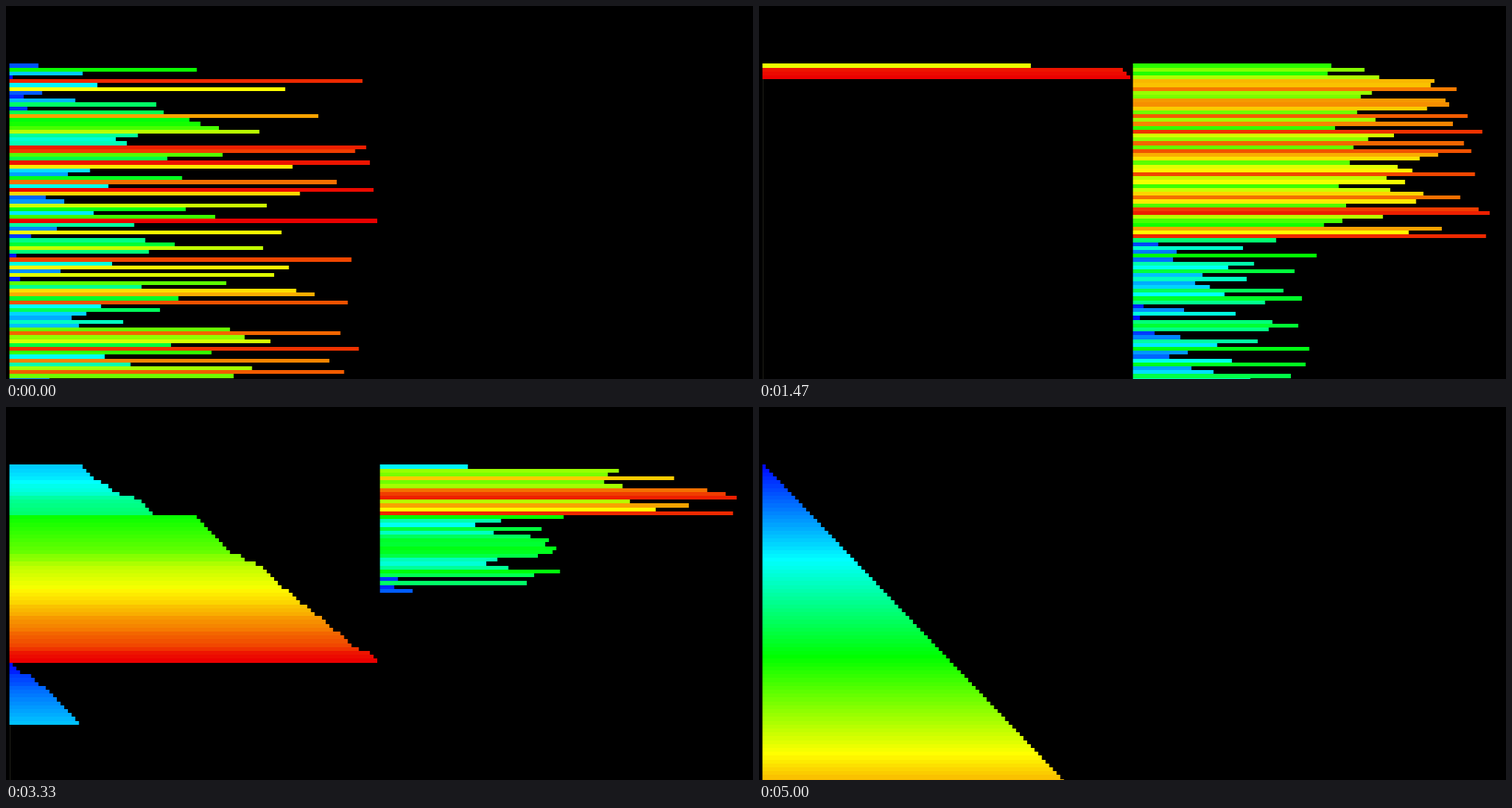
An HTML page with a canvas that plays this animation: 1000 px wide and 500 px high, repeating every 5070 ms.

```html
<!DOCTYPE html>
<html lang="en">
<head>
<meta charset="utf-8">
<title>Two-stack sort</title>
<style>
  html, body { margin: 0; width: 100%; height: 100%; overflow: hidden; background: #000; }
  canvas { display: block; width: 100%; height: 100%; }
</style>
</head>
<body>
<canvas id="stage" width="1000" height="500"></canvas>
<script>
const ctx = document.getElementById('stage').getContext('2d');

const LOOP = 5070, STEP = 200 / 3;
const TOP = 77.3, ROW = 5.2, UNIT = 4.93;
const LEFT_X = 4, RIGHT_X = 500;

const shuffled = [
  8, 51, 20, 1, 96, 24, 75, 9, 4, 18, 40, 5, 42, 84, 49, 52, 57, 68, 35, 29,
  32, 97, 94, 58, 43, 98, 77, 22, 16, 47, 89, 27, 99, 79, 10, 15, 70, 48, 23, 56,
  100, 34, 13, 74, 6, 37, 45, 69, 38, 2, 93, 28, 76, 14, 72, 3, 59, 36, 78, 83,
  46, 92, 25, 41, 21, 17, 31, 19, 60, 90, 64, 71, 44, 95, 55, 26, 87, 33, 66, 91,
  61, 11, 80, 86, 85, 62, 65, 88, 50, 81, 12, 30, 82, 67, 53, 7, 63, 54, 73, 39
];

// Pace of the sort: [time step, operations done]
const pace = [[0, 0], [3.25, 0], [12, 70], [22, 148], [39, 286], [50, 370], [59, 446], [70.75, 540], [77, 540]];

// Runs the whole sort and returns the stacks after every operation.
function recordSort(values) {
  const a = [...values], b = [];
  const history = [];
  const record = () => history.push([[...a], [...b]]);
  const turn = (stack, dir) => dir > 0 ? stack.push(stack.shift()) : stack.unshift(stack.pop());
  const push = (from, to) => { to.unshift(from.shift()); record(); };

  // Signed rotations; both stacks turn in one operation when they agree.
  function rotate(ra, rb) {
    while (ra || rb) {
      const da = Math.sign(ra), db = Math.sign(rb);
      const both = da === db;
      if (da) { turn(a, da); ra -= da; }
      if (db && (both || !da)) { turn(b, db); rb -= db; }
      record();
    }
  }

  function targetIndex(v) {
    const larger = a.filter(x => x > v);
    return a.indexOf(Math.min(...(larger.length ? larger : a)));
  }

  function cheapestMove() {
    let best = { cost: Infinity };
    b.forEach((v, up) => {
      const ia = targetIndex(v);
      const backA = ia ? ia - a.length : 0, backB = up ? up - b.length : 0;
      for (const ra of [ia, backA]) for (const rb of [up, backB]) {
        const cost = ra * rb > 0 ? Math.max(Math.abs(ra), Math.abs(rb)) : Math.abs(ra) + Math.abs(rb);
        if (cost < best.cost) best = { cost, ra, rb };
      }
    });
    return best;
  }

  record();
  for (const v of values) v <= 51 ? push(a, b) : rotate(1, 0);
  while (a.length > 3) a[0] < 98 ? push(a, b) : rotate(1, 0);
  while (b.length) {
    const { ra, rb } = cheapestMove();
    rotate(ra, rb);
    push(b, a);
  }
  while (a[0] !== 1) rotate(-1, 0);
  return history;
}

// Blue, cyan, green, yellow, red in four equal spans
function colour(v) {
  const span = Math.min(3, Math.floor(v / 25));
  const f = v / 25 - span;
  const up = Math.round(255 * f), down = 255 - up;
  return 'rgb(' + [
    [0, up, 255],
    [0, 255, down],
    [up, 255, 0],
    [Math.round(255 - 20 * f), down, 0]
  ][span] + ')';
}

function operationsAt(step) {
  const i = pace.findIndex(p => p[0] > step);
  const [s0, n0] = pace[i - 1], [s1, n1] = pace[i];
  return Math.round(n0 + (n1 - n0) * (step - s0) / (s1 - s0));
}

function drawStack(stack, x) {
  stack.forEach((v, i) => {
    const y = Math.round(TOP + i * ROW);
    ctx.fillStyle = colour(v);
    ctx.fillRect(x + 0.6, y, v * UNIT - 0.6, Math.round(TOP + (i + 1) * ROW) - y);
  });
}

const history = recordSort(shuffled);

function draw(now) {
  const step = Math.floor((now % LOOP + 4) / STEP);
  const [a, b] = history[Math.min(operationsAt(step), history.length - 1)];
  ctx.fillStyle = '#000';
  ctx.fillRect(0, 0, 1000, 500);
  ctx.fillStyle = '#1e1e18';
  ctx.fillRect(5, TOP + a.length * ROW, 1, 500);
  drawStack(a, LEFT_X);
  drawStack(b, RIGHT_X);
}

let start;
function tick(now) {
  start ??= now;
  draw(now - start);
  requestAnimationFrame(tick);
}
draw(0);
requestAnimationFrame(tick);
</script>
</body>
</html>
```
